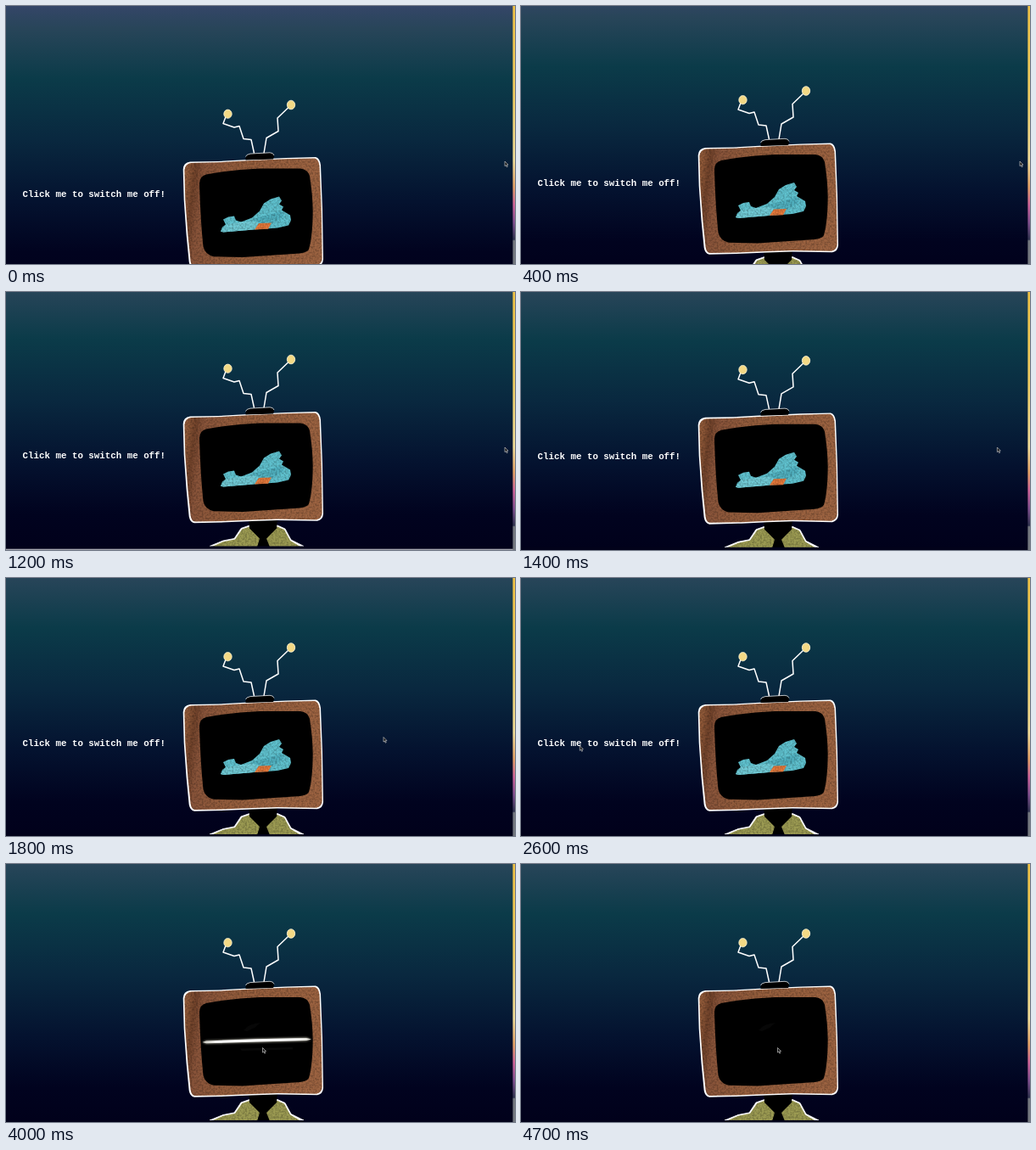
Recreate the animation shown at these times as an HTML page. Size 600 px wide and 304 px high, loop 4800 ms.

```html
<!DOCTYPE html>
<html lang="en">
<head>
<meta charset="utf-8">
<title>Television</title>
<style>
html, body { margin: 0; width: 100%; height: 100%; overflow: hidden; background: #01031c; }
svg { display: block; width: 600px; height: 304px; }
text { font: bold 10.8px "Courier New", "Liberation Mono", monospace; fill: #fff; }
</style>
</head>
<body>
<svg viewBox="0 0 600 304">
  <defs>
    <linearGradient id="sky" gradientUnits="userSpaceOnUse" x1="0" y1="-30" x2="0" y2="304">
      <stop offset="0" stop-color="#36466a"/>
      <stop offset=".09" stop-color="#284559"/>
      <stop offset=".265" stop-color="#0b3b49"/>
      <stop offset=".48" stop-color="#09283f"/>
      <stop offset=".7" stop-color="#04122f"/>
      <stop offset=".88" stop-color="#01031f"/>
      <stop offset="1" stop-color="#01011b"/>
    </linearGradient>
    <linearGradient id="edge" x1="0" y1="0" x2="0" y2="1">
      <stop offset="0" stop-color="#f0c244"/>
      <stop offset=".35" stop-color="#f0cd62"/>
      <stop offset=".6" stop-color="#f1dc98"/>
      <stop offset=".7" stop-color="#e5a266"/>
      <stop offset=".77" stop-color="#d0649a"/>
      <stop offset=".84" stop-color="#80508f"/>
      <stop offset=".905" stop-color="#30344f"/>
      <stop offset=".91" stop-color="#74787f"/>
      <stop offset="1" stop-color="#74787f"/>
    </linearGradient>
    <linearGradient id="wood" x1="0" y1="0" x2="1" y2=".1">
      <stop offset="0" stop-color="#98613f"/>
      <stop offset=".04" stop-color="#8d5737"/>
      <stop offset=".09" stop-color="#70422a"/>
      <stop offset=".15" stop-color="#89543a"/>
      <stop offset=".4" stop-color="#945d3c"/>
      <stop offset="1" stop-color="#9c6341"/>
    </linearGradient>
    <linearGradient id="glow">
      <stop offset="0" stop-color="#c8c7bd"/>
      <stop offset=".15" stop-color="#fff"/>
      <stop offset=".85" stop-color="#fff"/>
      <stop offset="1" stop-color="#d8d7cd"/>
    </linearGradient>
    <filter id="grain" x="-5%" y="-5%" width="110%" height="110%" color-interpolation-filters="sRGB">
      <feTurbulence type="fractalNoise" baseFrequency=".45" numOctaves="2" seed="4"/>
      <feColorMatrix values="0 0 0 0 0  0 0 0 0 0  0 0 0 0 0  .6 0 0 0 -.23"/>
      <feComposite in2="SourceGraphic" operator="in" result="specks"/>
      <feMerge><feMergeNode in="SourceGraphic"/><feMergeNode in="specks"/></feMerge>
    </filter>
    <filter id="soft" x="-10%" y="-150%" width="120%" height="400%">
      <feGaussianBlur stdDeviation=".8"/>
    </filter>
  </defs>

  <g id="page">
    <rect y="-40" width="600" height="400" fill="url(#sky)"/>
    <text id="label" x="19.6" y="198" xml:space="preserve">Click me to switch me off!</text>
  </g>

  <g id="tv" stroke-linejoin="round">
    <path d="M240 302L256 295.5L269 293L277 281L287 277.5H320L329 281.5L336 294.5L351 302Z"
          fill="#fff" stroke="#fff" stroke-width=".8"/>
    <path d="M243 302.5L256 296.8L270 294L278.3 282L287 279H320L328 282.5L335 295.5L347 302.5Z"
          fill="#9b9a52" filter="url(#grain)"/>
    <path d="M286 268H320L319 281L307 293L311 303H296L299 293L287 281Z" fill="#000"/>
    <rect y="302" width="600" height="60" fill="#02021a"/>
    <rect y="305.2" width="600" height="1.4" fill="#a5a6ae"/>

    <g fill="none" stroke="#fff" stroke-width="1.5">
      <path d="M259 96L256 104L269 108.5L275 107L280 122L289 123L292.5 139"/>
      <path d="M333 85L320 97.5L321 113L307 121L304 139"/>
    </g>
    <g fill="#f3d985" stroke="#fdf6db" stroke-width=".8">
      <ellipse cx="261.5" cy="92.7" rx="4.7" ry="5.1"/>
      <ellipse cx="336" cy="82" rx="4.7" ry="5.3"/>
    </g>

    <path d="M208.7 158Q209 150 217 149L250 148.5L285 146.5L330 144.5L365 143.6Q370 145 371 153L373 205L374 264Q373.5 271 367 272.3L320 271.5L290 272.5L260 273.8L222 274.8Q217 274 215.7 267L212.6 235L209.7 194Z"
          fill="#fff"/>
    <path d="M210.4 159Q211 152 218 150.6L250 149.8L285 147.8L330 145.8L364 145Q368.5 146 369.5 154L371.7 205L372.6 263Q372 269.5 366 270.8L320 270L290 271L260 272.3L223 273Q218.5 272.5 217.6 266L214.4 235L211.3 194Z"
          fill="url(#wood)" filter="url(#grain)"/>
    <path d="M282.5 147Q282 140.5 288 139.8L311 138.5Q315.5 138.5 316 142.5L315 146Z" fill="#000"/>
    <path d="M282.5 143Q283 140.5 288 139.6L311 138.3Q315 138.3 316 141.5" fill="none" stroke="#e8e8e8" stroke-width=".8"/>
    <path d="M228 175Q228 166 236 164Q265 158.5 299 157L347 157Q356 158 358 166Q361.5 188 361.7 207Q361.5 237 357 252Q355 257 339 257.5L279 261.4L245 260.7Q235 259 232.5 249Q229 215 228 175Z" fill="#000"/>

    <g id="map">
      <g filter="url(#grain)">
        <path d="M253 231L255 226L259 223L256 217L262 214L269 213L271 218L277 220L290 215L299 207L304 198L312 193L322 190L325 195L322 199L327 202L325 206L330 209L335 212L336 218L333 224L320 227L292 229L256 232Z" fill="#5fc1ce"/>
        <path d="M253 231L259 223L277 220L291 219L301 222L292 229L256 232Z" fill="#70c9d4"/>
        <path d="M290 217L325 207L327 214L312 222L299 221Z" fill="#50b0bf"/>
        <path d="M298 221.5L313 221L309 228.3L293 229Z" fill="#e3783b"/>
      </g>
    </g>
    <path id="ghost" d="M280 196Q286 188 300 187L293 193L284 197Z" fill="#070707"/>
    <g id="beam">
      <path d="M276 217.5L338 216V218.5L278 220Z" fill="#090909"/>
      <path d="M231.5 210L236 207.7L295 205.6L354 204.2L360 206.4L354 208.8L295 210.4L236 212Z" fill="#bbb9ac" opacity=".7" filter="url(#soft)"/>
      <path d="M231.5 210L236 208.4L295 206.3L354 204.9L360 206.4L354 208.1L295 209.6L236 211.2Z" fill="url(#glow)"/>
    </g>
  </g>

  <rect x="597.4" width="2.6" height="304" fill="url(#edge)"/>
  <path id="cursor" d="M0 0V5.6L1.3 4.5L2.3 6.7L3.2 6.3L2.3 4.1H4Z" fill="#111" stroke="#ddd" stroke-width=".6"/>
</svg>
<script>
const LOOP = 4800, STEP = 100, CLICK = 3700;
const el = id => document.getElementById(id);
const [page, tv, label, map, ghost, beam, cursor] =
  ["page", "tv", "label", "map", "ghost", "beam", "cursor"].map(el);

// Each key is [time, value, ...]; values between keys are linear.
const tvKeys = [[0, 34.5], [400, 18], [800, 5.5], [1200, -2.5], [1500, -.5], [1700, 0]];
const pageKeys = [[0, 26.5], [400, 13.5], [800, 3.5], [1200, -2.5], [1500, -.5], [1700, 0]];
const cursorKeys = [
  [1200, 588, 183], [1500, 548, 183], [1800, 445, 187.5], [2400, 160, 197],
  [2700, 24, 198], [3100, 130, 200], [3400, 304.5, 214], [3600, 302.5, 216.5]
];

function at(keys, t) {
  const i = keys.findIndex(k => k[0] > t);
  if (i === 0) return keys[0].slice(1);
  if (i < 0) return keys[keys.length - 1].slice(1);
  const a = keys[i - 1], b = keys[i], p = (t - a[0]) / (b[0] - a[0]);
  return a.slice(1).map((v, n) => v + (b[n + 1] - v) * p);
}

const ramp = (t, from, to) => Math.min(1, Math.max(0, (t - from) / (to - from)));
const move = (node, x, y) => node.setAttribute("transform", `translate(${x} ${y})`);
const show = (node, on) => node.setAttribute("visibility", on ? "visible" : "hidden");
const scaleAt = (node, x, y, sx, sy) =>
  node.setAttribute("transform", `translate(${x} ${y}) scale(${sx} ${sy}) translate(${-x} ${-y})`);

function draw(now) {
  const t = Math.floor(now % LOOP / STEP) * STEP;
  move(page, 0, at(pageKeys, t)[0]);
  move(tv, 0, at(tvKeys, t)[0]);
  move(cursor, ...at(cursorKeys, t));

  show(label, t < CLICK);
  show(map, t < CLICK + 200);
  scaleAt(map, 296, 208, 1, 1 - .9 * ramp(t, CLICK, CLICK + 200));
  show(beam, t >= CLICK + 200 && t < 4500);
  scaleAt(beam, 296, 208, 1 - ramp(t, 4100, 4500), 1);
  show(ghost, t >= CLICK + 200);
  requestAnimationFrame(draw);
}
requestAnimationFrame(draw);
</script>
</body>
</html>
```
